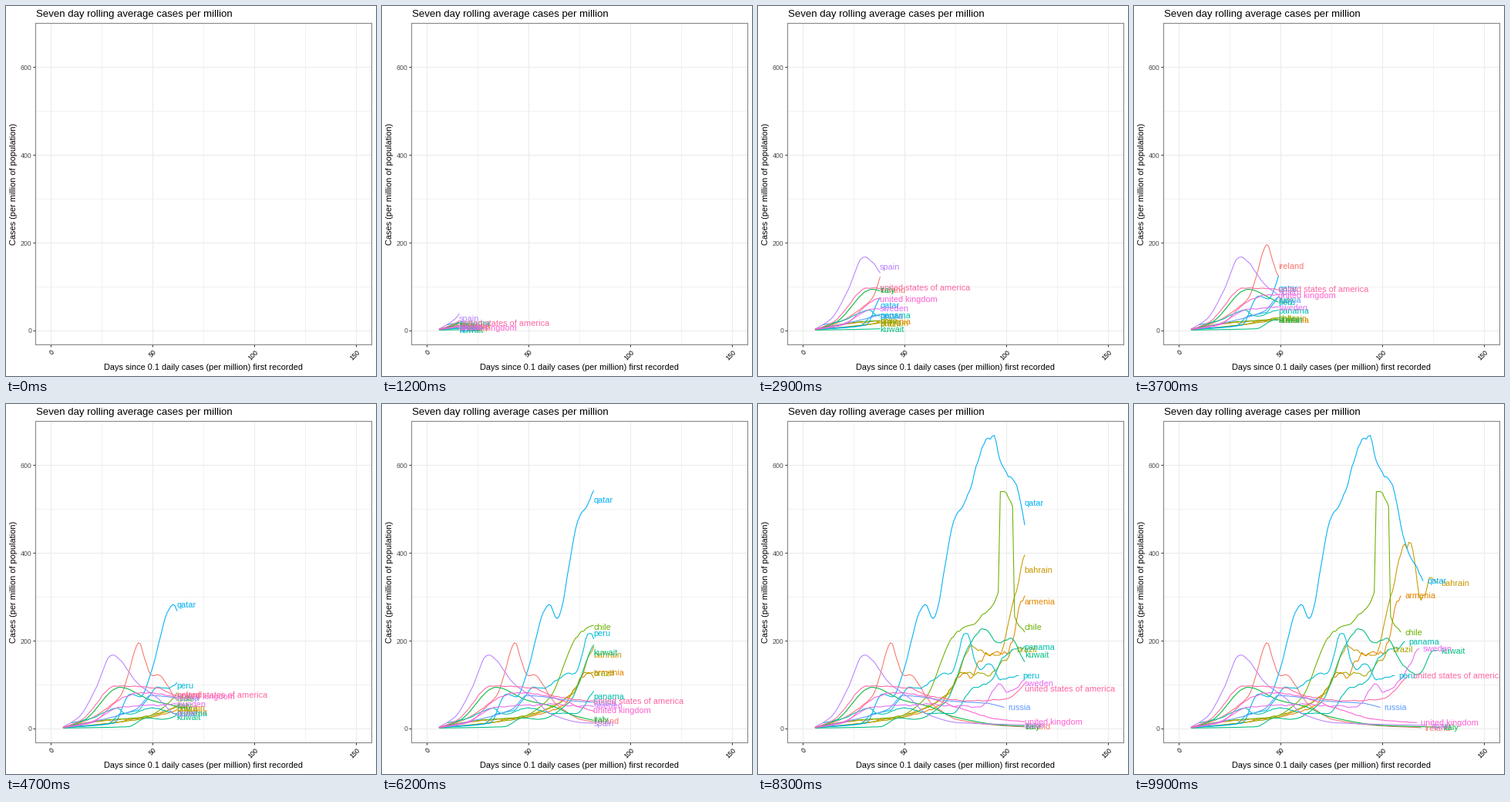
Animation, 480 px wide and 480 px high, one loop 10000 ms. Source, as a matplotlib script:

```python
import numpy as np
import matplotlib.pyplot as plt
from matplotlib.animation import FuncAnimation

SIZE, DPI = 480, 80
PX = 72 / DPI                       # one pixel in points
FRAMES, LAST_DAY, LABEL_GAP = 100, 130, 2
COUNTRIES = 15
INK, TICK = "#333333", "#4d4d4d"

plt.rcParams["font.family"] = "Liberation Sans"
fig = plt.figure(figsize=(SIZE / DPI, SIZE / DPI), dpi=DPI, facecolor="white")
ax = fig.add_axes([38.3 / SIZE, 1 - 439.3 / SIZE, 435.9 / SIZE, 417.1 / SIZE])
ax.set(xlim=(-7.5, 157.5), ylim=(-32.2, 700.2))


def caption(x, y, text, size, **kw):
    fig.text(x / SIZE, 1 - y / SIZE, text, fontsize=size * PX,
             va="baseline", rotation_mode="anchor", **kw)


def style_axes():
    ax.set_axisbelow(True)
    ax.set_xticks(range(0, 151, 50))
    ax.set_yticks(range(0, 601, 200))
    ax.set_xticks(range(25, 126, 50), minor=True)
    ax.set_yticks(range(100, 501, 200), minor=True)
    ax.grid(which="major", color="#ebebeb", lw=1.07 * PX)
    ax.grid(which="minor", color="#ebebeb", lw=0.6 * PX)
    ax.tick_params(which="minor", length=0)
    ax.tick_params(which="major", length=2.75 * PX, width=1.07 * PX, pad=2.2 * PX,
                   color=INK, labelcolor=TICK, labelsize=8.8 * PX)
    for tick in ax.get_xticklabels():
        tick.set(rotation=45, ha="right", va="top", rotation_mode="anchor",
                 color="black")
    for spine in ax.spines.values():
        spine.set(color="#858585", linewidth=1.07 * PX, zorder=10)


def hue_color(i):
    """Evenly spaced hues at chroma 100 and luminance 65 in CIE LUV."""
    h, lum, chroma = np.radians(15 + 360 * i / COUNTRIES), 65, 100
    u = chroma * np.cos(h) / (13 * lum) + 0.1978
    v = chroma * np.sin(h) / (13 * lum) + 0.4683
    y = ((lum + 16) / 116) ** 3
    x = 9 * y * u / (4 * v)
    z = 3 * y / v - 5 * y - x / 3
    rgb = np.array([3.2405 * x - 1.5371 * y - 0.4985 * z,
                    -0.9693 * x + 1.8760 * y + 0.0416 * z,
                    0.0556 * x - 0.2040 * y + 1.0572 * z])
    rgb = np.clip(rgb, 0, 1)
    return np.where(rgb > 0.0031308, 1.055 * rgb ** (1 / 2.4) - 0.055, 12.92 * rgb)


def smooth(t, x, y):
    """Monotone cubic through the points (x, y)."""
    h = np.diff(x)
    s = np.diff(y) / h
    m = np.zeros(len(x))
    m[0], m[-1] = s[0], s[-1]
    a, b = s[:-1], s[1:]
    turn = a * b <= 0
    m[1:-1] = np.where(turn, 0, 2 * a * b / np.where(turn, 1, a + b))
    i = np.clip(np.searchsorted(x, t, "right") - 1, 0, len(x) - 2)
    u = (t - x[i]) / h[i]
    return (y[i] * (1 + 2 * u) * (1 - u) ** 2 + y[i + 1] * u * u * (3 - 2 * u)
            + h[i] * u * (1 - u) * (m[i] * (1 - u) - m[i + 1] * u))


class Country:
    def __init__(self, index, name, jitter, points):
        color = hue_color(index)
        x, y = np.array(points, float).T
        self.days = np.arange(x[0], x[-1] + 1)
        noise = np.random.default_rng(index).normal(size=len(self.days) + 1)
        wobble = (noise[1:] + noise[:-1]) / 2
        self.cases = smooth(self.days, x, y) * (1 + jitter * wobble)
        self.line, = ax.plot([], [], color=color, lw=1.07 * PX, zorder=3,
                             solid_capstyle="butt")
        self.label = ax.annotate(name, (0, 0), xytext=(-0.3 * PX, -3.8 * PX),
                                 textcoords="offset points", color=color,
                                 fontsize=11 * PX, va="baseline", zorder=4,
                                 annotation_clip=False, clip_on=True)
        self.label.set_clip_box(ax.bbox)

    def reveal(self, day):
        n = int(np.clip(day - self.days[0] + 1, 0, len(self.days)))
        self.line.set_data(self.days[:n], self.cases[:n])
        k = min(int(day - LABEL_GAP - self.days[0]), len(self.days) - 1)
        self.label.set_visible(k >= 0)
        if k >= 0:
            self.label.xy = (self.days[k] + LABEL_GAP, self.cases[k])


countries = []


def add(name, jitter, *points):
    countries.append(Country(len(countries), name, jitter, points))


style_axes()
caption(39, 14, "Seven day rolling average cases per million", 13.2)
caption(256, 472, "Days since 0.1 daily cases (per million) first recorded", 11,
        ha="center")
caption(13, 231, "Cases (per million of population)", 11, ha="center", rotation=90)

# Key points of each curve: (day, cases)
add("ireland", 0.02, (6, 3), (15, 14), (34, 73), (38, 122), (43, 194), (49, 122),
    (54, 116), (63, 58), (77, 19), (100, 6), (119, 2))
add("armenia", 0.05, (6, 3), (25, 17), (47, 25), (66, 50), (79, 124), (83, 120),
    (88, 165), (99, 172), (103, 205), (107, 284), (109, 289))
add("bahrain", 0.03, (6, 2), (26, 10), (47, 28), (60, 46), (74, 95), (82, 184),
    (96, 165), (104, 308), (109, 387), (114, 417), (119, 297), (125, 343), (127, 333))
add("brazil", 0.03, (6, 1), (46, 23), (60, 46), (71, 80), (78, 127), (91, 122),
    (97, 148), (103, 176))
add("chile", 0.01, (6, 3), (26, 19), (46, 26), (60, 68), (74, 211), (88, 255),
    (96, 314), (97, 543), (103, 502), (104, 255), (109, 218))
add("italy", 0.005, (6, 2), (16, 18), (34, 94), (49, 65), (62, 50), (74, 27),
    (100, 7), (128, 3))
add("kuwait", 0.01, (6, 1), (38, 4), (47, 24), (55, 21), (70, 60), (82, 192),
    (89, 228), (96, 194), (102, 207), (109, 152), (118, 123), (125, 178), (127, 177))
add("panama", 0.03, (10, 13), (20, 23), (32, 47), (38, 33), (50, 47), (62, 34),
    (74, 35), (82, 86), (92, 107), (98, 157), (111, 201))
add("peru", 0.02, (6, 2), (28, 10), (34, 33), (42, 40), (53, 94), (58, 93),
    (69, 124), (73, 126), (80, 216), (87, 132), (92, 148), (97, 113), (106, 121))
add("qatar", 0.008, (6, 3), (31, 12), (39, 79), (44, 72), (50, 140), (57, 262),
    (60, 284), (64, 251), (74, 470), (81, 532), (90, 655), (94, 666), (97, 602),
    (105, 550), (111, 422), (120, 337))
add("russia", 0.005, (6, 2), (22, 17), (42, 44), (49, 75), (74, 62), (91, 57),
    (99, 48))
add("spain", 0.008, (6, 3), (14, 27), (22, 90), (30, 169), (43, 101), (52, 71),
    (61, 33), (77, 13), (122, 7))
add("sweden", 0.03, (6, 2), (20, 15), (34, 49), (60, 54), (80, 51), (87, 48),
    (97, 102), (100, 83), (109, 114), (118, 182))
add("united kingdom", 0.02, (6, 2), (20, 13), (35, 69), (45, 82), (60, 72),
    (80, 42), (96, 21), (117, 13))
add("united states of america", 0.015, (6, 2), (15, 19), (32, 97), (53, 91),
    (60, 77), (82, 63), (100, 68), (113, 121))


def update(frame):
    day = int((frame + 0.5) * LAST_DAY / (FRAMES - 1))
    for country in countries:
        country.reveal(min(day, LAST_DAY))
    return []


anim = FuncAnimation(fig, update, frames=FRAMES, interval=100,
                     repeat=True, repeat_delay=0)
plt.show()
```
